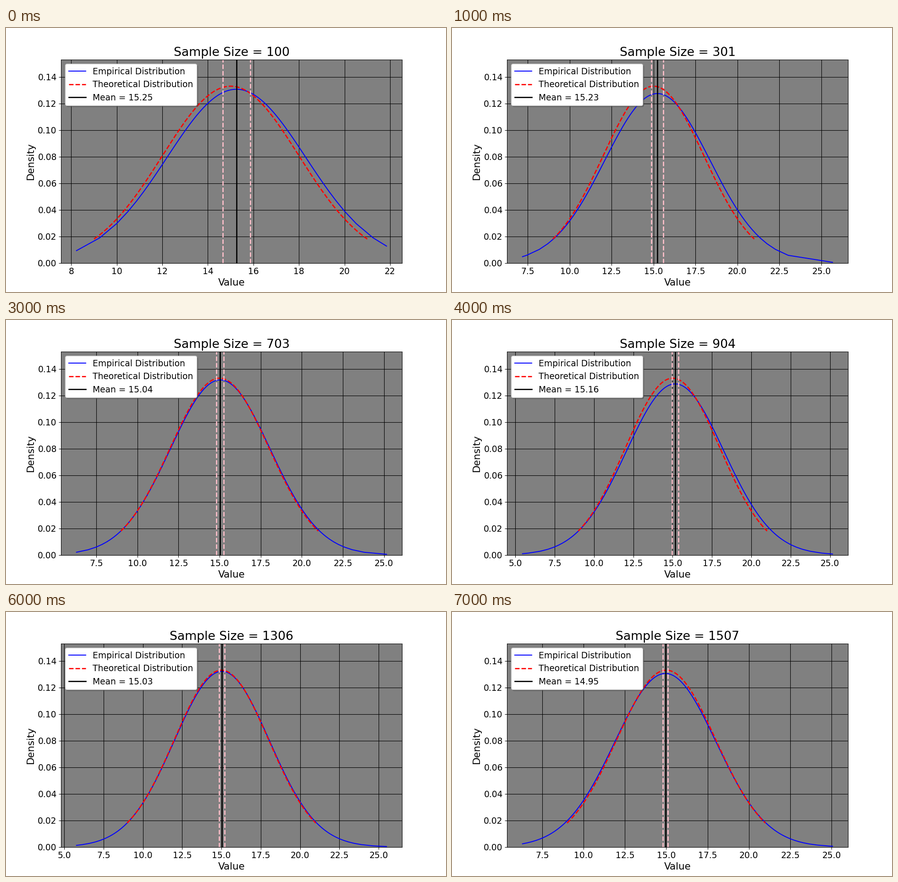
Write a matplotlib script that moves like this. It is 960 by 576 pixels and loops after 8000 ms.

```python
import numpy as np
import matplotlib.pyplot as plt
from matplotlib.animation import FuncAnimation

MU, SIGMA = 15, 3
FIRST_SIZE, SIZE_STEP = 100, 201

# mean, standard deviation, minimum and maximum of each sample
SAMPLES = [
    (15.253, 3.053, 8.2292, 21.8452),
    (15.23, 3.13, 7.194, 25.66),
    (14.96, 3.081, 5.55, 24.13),
    (15.04, 3.03, 6.3, 25.15),
    (15.16, 3.10, 5.4565, 25.16),
    (15.07, 2.979, 5.514, 23.82),
    (15.03, 3.02, 5.78, 25.5),
    (14.95, 3.057, 6.302, 25.06),
]


def normal_pdf(x, mean, std):
    return np.exp(-0.5 * ((x - mean) / std) ** 2) / (std * np.sqrt(2 * np.pi))


def sorted_sample(size, mean, std, low, high):
    """Evenly ranked values, sparse in the tails, between the two extremes."""
    p = (np.arange(1, size - 1) + 0.5) / size
    x = mean + 0.47 * std * np.log(p / (1 - p))
    return np.r_[low, x[(x > low) & (x < high)], high]


plt.rcParams.update({"font.family": "DejaVu Sans", "axes.titlesize": 20,
                     "axes.labelsize": 16, "xtick.labelsize": 14,
                     "ytick.labelsize": 14, "legend.fontsize": 14})
fig, ax = plt.subplots(figsize=(10, 6), dpi=96)
theory_x = np.linspace(MU - 2 * SIGMA, MU + 2 * SIGMA, 200)
theory_y = normal_pdf(theory_x, MU, SIGMA)
peak = normal_pdf(MU, MU, SIGMA)


def update(i):
    mean, std, low, high = SAMPLES[i]
    size = FIRST_SIZE + SIZE_STEP * i
    error = 1.96 * std / np.sqrt(size - 1)
    x = sorted_sample(size, mean, std, low, high)

    ax.clear()
    ax.set_facecolor("gray")
    ax.plot(x, normal_pdf(x, mean, std), color="blue",
            label="Empirical Distribution")
    ax.plot(theory_x, theory_y, color="red", ls="--", lw=2,
            label="Theoretical Distribution")
    ax.axvline(mean, color="black", lw=2, label=f"Mean = {mean:.2f}")
    for bound in (mean - error, mean + error):
        ax.axvline(bound, color="pink", ls="--", lw=2)
    ax.set_ylim(0, 1.15 * peak)
    ax.set_title(f"Sample Size = {size}")
    ax.set_xlabel("Value")
    ax.set_ylabel("Density")
    ax.grid(color="black")
    ax.legend(loc="upper left", shadow=True)
    return ax.get_children()


anim = FuncAnimation(fig, update, frames=len(SAMPLES), interval=1000,
                     init_func=lambda: [], repeat=True, repeat_delay=0)
plt.show()
```
